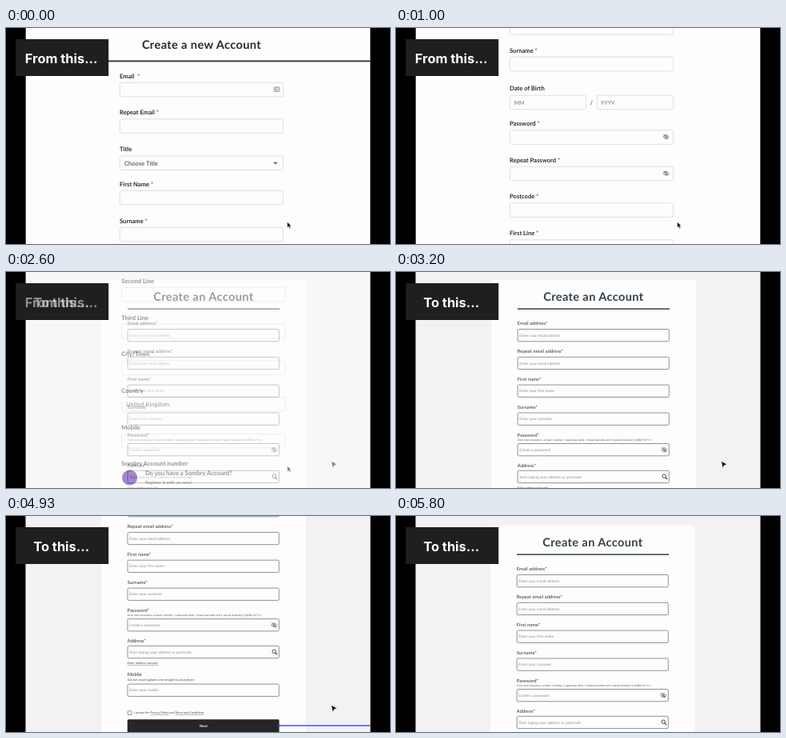
These frames come from a looping animation (480x270 px, 6390 ms). An HTML page:

```html
<!DOCTYPE html>
<html lang="en">
<head>
<meta charset="utf-8">
<title>Account form: before and after</title>
<style>
  html, body { margin: 0; width: 100%; height: 100%; overflow: hidden; background: #000; }
  svg { display: block; width: 100vw; height: 100vh; font-family: Lato, "Open Sans", sans-serif; text-rendering: geometricPrecision; }
  .box { fill: #fdfdfd; stroke: #d8d8dc; stroke-width: .8; }
  .lab { font-size: 7.6px; font-weight: 700; fill: #2a2a2e; }
  .val { font-size: 7.6px; fill: #333; }
  .head { font-size: 14.6px; font-weight: 700; letter-spacing: .025em; text-anchor: middle; }
  .star { fill: #d8323a; }
  .box2 { fill: #fdfdfd; stroke: #7c8085; stroke-width: .85; }
  .lab2 { font-size: 5.8px; letter-spacing: .01em; fill: #2c3034; }
  .hold { font-size: 4.6px; letter-spacing: .015em; fill: #85888d; }
  .note { font-size: 3.7px; letter-spacing: .015em; fill: #3a3e42; }
  .link { text-decoration: underline; text-decoration-thickness: .35px; }
  .tag { font: 700 16.4px Inter, Lato, sans-serif; fill: #fff; text-anchor: middle; }
</style>
</head>
<body>
<svg viewBox="0 0 480 270">
  <defs>
    <clipPath id="view"><rect x="24.7" width="430.6" height="270"/></clipPath>
    <g id="eye" fill="none" stroke="#505357">
      <path d="M-3.6 0Q0-5 3.6 0Q0 5-3.6 0Z" stroke-width=".7"/>
      <circle r="1.2" stroke-width=".7"/>
      <path d="M-3-3L3 3" stroke-width=".8"/>
    </g>
  </defs>
  <rect width="480" height="270"/>
  <g clip-path="url(#view)">
    <rect x="24" width="432" height="270" fill="#fdfdfd"/>
    <g id="before"></g>
    <path d="M351.6 242.4V249.6L353.3 248.1L354.5 250.8L355.8 250.2L354.6 247.6H356.8Z" fill="#000" stroke="#fff" stroke-width=".5"/>
    <g id="layer" opacity="0">
      <rect x="24" width="432" height="270" fill="#f2f2f2"/>
      <g id="after"></g>
      <path id="arrow" d="M406.7 236.6L413.8 240.5L410.4 241.5L408.4 244.9Z" fill="#000" stroke="#fff" stroke-width=".5"/>
    </g>
  </g>
  <rect x="12.2" y="14" width="116" height="46" fill="#1f1f1f"/>
  <text class="tag" id="from" x="69.2" y="44">From this...</text>
  <text class="tag" id="to" x="69.2" y="44">To this...</text>
</svg>
<script>
const $ = id => document.getElementById(id);
const text = (cls, x, y, s, extra = '') => `<text class="${cls}" x="${x}" y="${y}" ${extra}>${s}</text>`;
const rect = (cls, x, y, w, h, r = 2) => `<rect class="${cls}" x="${x}" y="${y}" width="${w}" height="${h}" rx="${r}"/>`;
const eye = (x, y) => `<use href="#eye" x="${x}" y="${y}"/>`;

// Long form: label, label centre, required
const longForm = [
  ['Email', 60, 1], ['Repeat Email', 105.5, 1], ['Title', 151.5, 0], ['First Name', 195, 1],
  ['Surname', 241, 1], ['Password', 332.5, 1], ['Repeat Password', 378, 1], ['Postcode', 423.5, 1],
  ['First Line', 469.5, 1], ['Second Line', 515, 0], ['Third Line', 561, 0], ['City/Town', 606.5, 1],
  ['Country', 652, 0], ['Mobile', 698, 0]
];

function drawBefore() {
  let out = text('head', 244.5, 25.8, 'Create a new Account', 'fill="#2a2a2e"')
    + '<rect x="24" y="40.4" width="432" height="2" fill="#3d4045"/>';
  for (const [name, y, must] of longForm) {
    const star = must ? `<tspan class="star" dx="${name === 'Email' ? 4 : 2}">*</tspan>` : '';
    out += text('lab', 142, y + 2.7, name + star) + rect('box', 142.4, y + 8.3, 204.2, 17.6);
  }
  out += text('lab', 142, 290.7, 'Date of Birth')
    + rect('box', 142.4, 297.2, 95.2, 17.6) + rect('box', 251.4, 297.2, 95.2, 17.6)
    + text('val', 147.5, 308.7, 'MM', 'style="font-size:7px;fill:#777"')
    + text('val', 256, 308.7, 'YYYY', 'style="font-size:7px;fill:#777"')
    + text('val', 242.5, 308.7, '/')
    + text('val', 148, 171.5, 'Choose Title')
    + '<path d="M334.2 167.8H339.4L336.8 170.4Z" fill="#555"/>'
    + '<rect x="335.2" y="74" width="6.6" height="5.4" rx=".8" fill="#eee" stroke="#777" stroke-width=".8"/>'
    + '<path d="M336.4 75.8H338M336.4 77.4H338M339.2 75.4V78" stroke="#777" stroke-width=".7"/>'
    + eye(337.5, 349) + eye(337.5, 394.7)
    + text('val', 147.7, 671.8, 'United Kingdom')
    + text('lab', 142, 746.2, 'Sombry Account number')
    + '<circle cx="152.3" cy="761" r="9.6" fill="#4b12a0"/>'
    + text('lab', 171.6, 758, 'Do you have a Sombry Account?')
    + text('val', 171.6, 768.6, 'Register it with us now!', 'style="font-size:5.7px"');
  return out;
}

// Short form: label, label centre, field top, placeholder
const shortForm = [
  ['Email address*', 64, 71.5, 'Enter your email address'],
  ['Repeat email address*', 99, 106.3, 'Enter your email address'],
  ['First name*', 134, 141.1, 'Enter your first name'],
  ['Surname*', 169, 176, 'Enter your surname'],
  ['Password*', 203.5, 214.5, 'Create a password'],
  ['Address*', 242, 248.3, 'Start typing your address or postcode'],
  ['Mobile', 284, 296, 'Enter your mobile']
];

function drawAfter() {
  let out = '<rect x="119" y="9.5" width="255.5" height="400" fill="#fdfdfd"/>'
    + text('head', 246.9, 36.4, 'Create an Account', 'fill="#36434c"')
    + '<rect x="152" y="45.4" width="190" height="1.5" fill="#36434c"/>';
  for (const [name, y, top, hint] of shortForm)
    out += text('lab2', 151.8, y + 2.1, name) + rect('box2', 152.1, top, 189.2, 15.3, 1.5)
      + text('hold', 154.3, top + 9.3, hint);
  out += text('note', 151.8, 211, '10 or more characters, at least 1 number, 1 uppercase letter, 1 lowercase letter and 1 special character (!,.@£$%^&amp;*?+=)', 'style="font-size:3.1px"')
    + eye(335.2, 222.2)
    + '<g fill="none" stroke="#33373b"><circle cx="335.2" cy="255.2" r="2.2" stroke-width=".9"/><path d="M336.8 256.8L339 259" stroke-width="1.1"/></g>'
    + text('note link', 151.8, 271.2, 'Enter address manually')
    + text('note', 151.8, 292.4, 'Get live travel updates sent straight to your phone')
    + rect('box2', 152.3, 329.6, 4.8, 4.8, .6)
    + text('note', 160, 333.4, 'I accept the <tspan class="link">Privacy Policy</tspan> and <tspan class="link">Terms and Conditions</tspan>')
    + '<rect x="151.8" y="340.2" width="189.8" height="16" rx="1.5" fill="#262626"/>'
    + text('note', 247, 349.8, 'Next', 'text-anchor="middle" style="font-size:4.5px;font-weight:700;fill:#fff"')
    + '<path d="M341.5 348H456" stroke="#5a4bd8" stroke-width="1.5"/><circle cx="341.5" cy="348" r="1.6" fill="#5a4bd8"/>';
  return out;
}

// Moves: first tick, last tick, start, end, ease-in power, ease-out power
const scrollA = [[0, 10, 0, 174, 1.3, 1.7], [13, 21, 174, 343, 1.2, 1.6], [23, 30, 343, 504, 1.2, 1.7]];
const shiftA = [[16, 18, 0, 2.3, 1, 1]];
const fade = [[34, 44, 0, 1, 1, 1]];
const scrollB = [[55, 64, 0, 92, 1.2, 2], [73, 82, 92, -2, 1.3, 1.6]];
const shiftB = [[73, 82, 0, -1, 1.3, 1.6]];

function at(moves, tick) {
  let v = moves[0][2];
  for (const [a, b, from, to, p, q] of moves) {
    if (tick <= a) break;
    const u = Math.min(1, (tick - a) / (b - a));
    const i = u ** p, o = (1 - u) ** q;
    v = from + (to - from) * i / (i + o);
  }
  return v;
}

const LOOP = 6390, TICK = 1000 / 15;
$('before').innerHTML = drawBefore();
$('after').innerHTML = drawAfter();

function show(ms) {
  const tick = Math.floor(ms / TICK + .06);
  const mix = at(fade, tick);
  $('before').setAttribute('transform', `translate(${at(shiftA, tick)} ${-at(scrollA, tick)})`);
  $('after').setAttribute('transform', `translate(${at(shiftB, tick)} ${-at(scrollB, tick)})`);
  $('layer').setAttribute('opacity', mix);
  $('from').setAttribute('opacity', 1 - mix);
  $('to').setAttribute('opacity', mix);
  $('arrow').setAttribute('opacity', tick < 87 ? 1 : 0);
}

const start = performance.now();
function loop() {
  show((performance.now() - start) % LOOP);
  requestAnimationFrame(loop);
}
loop();
</script>
</body>
</html>
```
